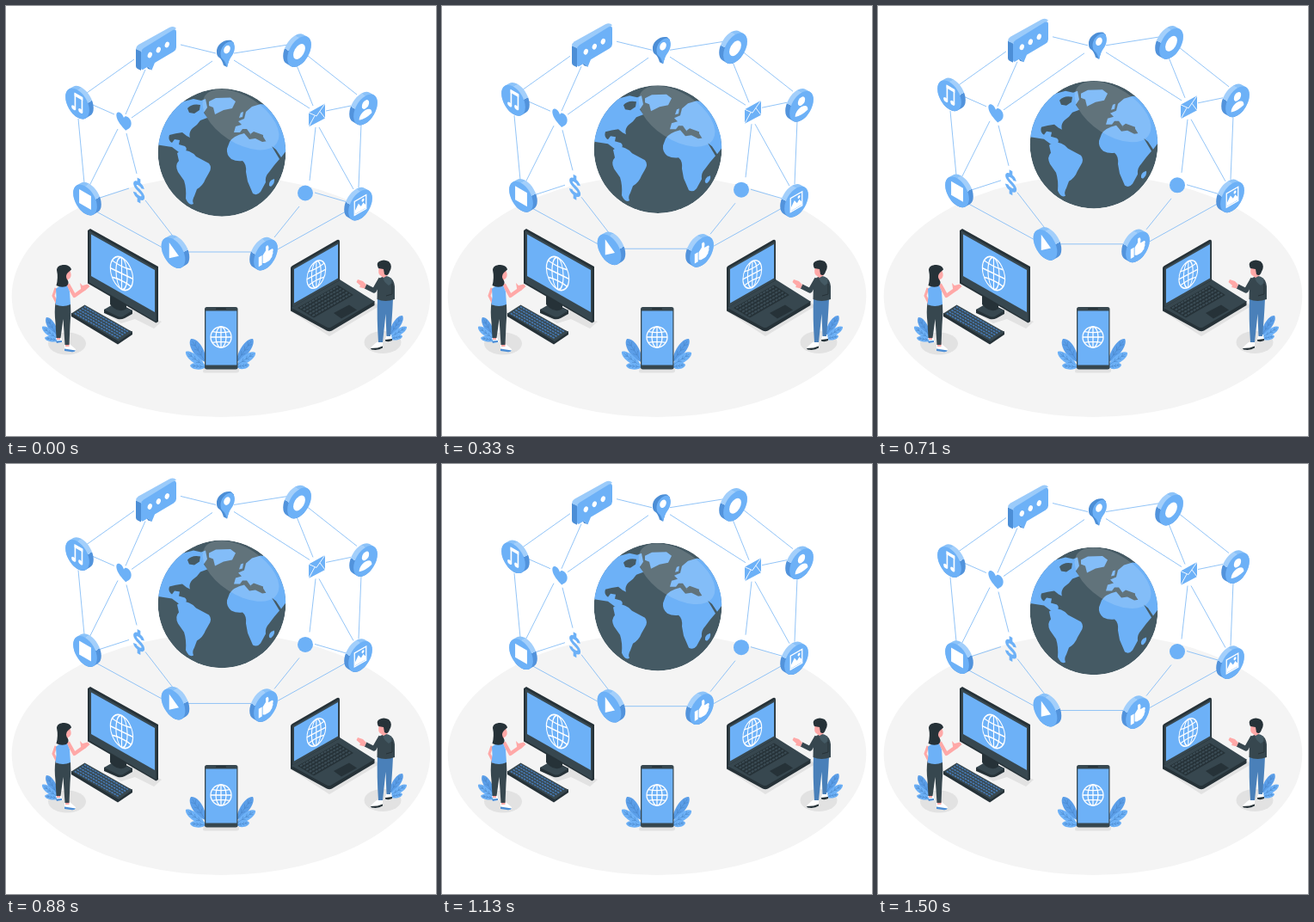
An HTML page for the animation above (1.54 s loop, 500 by 500 pixels).

```html
<!DOCTYPE html>
<html lang="en">
<head>
<meta charset="utf-8">
<title>Connected world</title>
<style>
html, body { margin: 0; width: 100%; height: 100%; overflow: hidden; background: #fff; }
svg { display: block; width: 100vw; height: 100vh; }
.b { fill: #6db1f7; }
.d { fill: #4c8ed6; }
.l { fill: #9bcbfa; }
.w { fill: #fff; }
.k { fill: #263238; }
.g { fill: #37474f; }
.m { fill: #455a64; }
.s { fill: #e2e2e2; }
.p { fill: #ffa8a7; }
.wire { fill: none; stroke: #fff; }
</style>
</head>
<body>
<svg viewBox="0 0 500 500">
  <defs>
    <clipPath id="ball"><circle cx="251" cy="170.4" r="74.3"/></clipPath>
    <linearGradient id="rim" gradientUnits="userSpaceOnUse" x1="-20" y1="-20" x2="20" y2="20">
      <stop offset=".3" stop-color="#8cc3f9"/><stop offset=".3" stop-color="#a3cffb"/>
      <stop offset=".58" stop-color="#a3cffb"/><stop offset=".58" stop-color="#5293dc"/>
    </linearGradient>
    <g id="coin">
      <path d="M0 0L5.7 -5.7" stroke="url(#rim)" stroke-width="32" stroke-linecap="round"/>
      <circle class="b" r="16"/>
    </g>
    <g id="net" class="wire">
      <circle r="16"/><ellipse rx="8" ry="16"/>
      <path d="M0 -16V16M-16 0H16M-13.4 -8.5Q0 -6 13.4 -8.5M-13.4 8.5Q0 6 13.4 8.5"/>
    </g>
  </defs>

  <rect class="w" width="500" height="500"/>
  <ellipse cx="250" cy="337.5" rx="243.3" ry="140.5" fill="#f4f4f4"/>

  <!-- desktop -->
  <path class="s" d="M117 358L148 352L181 367L172 375L150 364L134 369Z"/>
  <path class="k" d="M114 353V357L130 364Q134 365 138 363L147 358V354L134 347Z"/>
  <path class="g" d="M114 353L126 346L147 354L136 361Q133 362 130 361Z"/>
  <path class="k" d="M121 334L140 345V352Q133 357 125 351L121 347Z"/>
  <path class="k" d="M95 261L98 259L177 303V367L174.500 368.500L95 322.500Z"/>
  <path class="g" d="M97 261.500L174.500 305V367L97 321.500Z"/>
  <path class="b" d="M99 265.500L173 307V356L99 314Z"/>
  <use href="#net" transform="matrix(.82 .4 0 1.15 134.500 311)" stroke-width="1.400"/>
  <path class="k" d="M76 357V361L130 393.500L147 382V378.500Z"/>
  <path class="g" d="M76 357.500L91.500 347.500L147 379L131 390Z"/>
  <g id="keys" fill="none" stroke="#4679b3" stroke-width="1.600" stroke-dasharray="2.600 .9"></g>

  <!-- laptop -->
  <path class="s" d="M331 355L376 384L434 349L428 344Z"/>
  <path class="k" d="M331 350V354.500L373 377.500Q376 379 379 377.500L428.500 348V343Z"/>
  <path class="g" d="M331 350.500L388 318L428.500 343.500L378 373.500Q376 374.500 373 373.500Z"/>
  <path class="k" d="M339 351L386 324.500L404 336L358 362.500Z"/>
  <g id="pads" fill="none" stroke="#3b4c55" stroke-width="2" stroke-dasharray="3 1"></g>
  <path class="k" d="M381 357L399 347.500L408 353.500L390 363.500Z"/>
  <path class="k" d="M331 305Q331 303 333 302L385 272Q388 271 388 274V319L331 351.500Z"/>
  <path class="g" d="M333.500 304.500L387 274V319L333.500 350Z"/>
  <path class="b" d="M335 306L386 277V316.500L335 345.500Z"/>
  <use href="#net" transform="matrix(.68 -.36 0 .95 360.800 312)" stroke-width="1.600"/>

  <!-- people -->
  <ellipse class="s" cx="71" cy="392.500" rx="22" ry="13"/>
  <ellipse class="s" cx="438" cy="391" rx="21.500" ry="13"/>
  <g id="leaves"></g>

  <g>
    <path class="w" d="M58 386L64 384L66 391L60 392Z M68 394L74 393L81 399Q82 402 77 402L68 400Z"/>
    <path d="M58 389.500L65 389V391L59 392ZM68 398.500L81 400.500Q80 403 75 402L68 401Z" fill="#4c8ed6"/>
    <path class="p" d="M59 383H63V388H59ZM69 391H73.500V396H69Z"/>
    <path class="g" d="M57.500 345L75 346Q76 358 74.500 371L73.500 394H68.500L66.500 364L63.500 386H58.500L57.500 368Q56 355 57.500 345Z"/>
    <path d="M58 328L55 337L60 347" fill="none" stroke="#ffa8a7" stroke-width="3"/>
    <path d="M72 323.500L79.500 337L90 329.500" fill="none" stroke="#ffa8a7" stroke-width="4.200" stroke-linejoin="round"/>
    <path class="p" d="M87 328L86 322L89 325L95 323.500L97.500 326L92 331L88 332Z"/>
    <path class="b" d="M58 329Q63 324 71 325L74 332L75 347Q66 351 57.500 347L58.500 338Z"/>
    <path class="p" d="M68 308H74.500Q77 314 74 317L72 318V325H66Z"/>
    <path class="k" d="M59 307C59 299 75 299 76 306.500L72 310Q69 313 70.500 317Q75 323 70 326Q64 328 58.500 325Q61 316 59 307Z"/>
  </g>

  <g>
    <path class="w" d="M431 391L438 390V397Q434 401 426 399L424 397ZM442 383L448 382L449 388Q446 391 441 389Z"/>
    <path class="k" d="M424 398L432 397.500L438 395.500V397.500Q433 401 425 399.500ZM441 388L449 387V389Q445 391 441 389.500Z"/>
    <path d="M432 340L450 340Q449 364 447 384H442.500L441.500 358L438 391H433Q431 362 432 340Z" fill="#4a80b9"/>
    <path d="M436 317L428 331L418 326" fill="none" stroke="#37474f" stroke-width="5.500" stroke-linejoin="round"/>
    <path class="p" d="M419 324L415 320L409 318L407.500 321L412 325L411 327L417 328.500Z"/>
    <path class="g" d="M432 320Q436 313 445 315Q451 317 452 326V341Q441 345 431.500 341Z"/>
    <path class="m" d="M438 315Q443 312 448 317Q450 322 445 325Q439 321 438 315Z"/>
    <path d="M449 323V335L442 337" fill="none" stroke="#263238"/>
    <path class="p" d="M434 303Q432 311 435 313L439 316L444 313V302Z"/>
    <path class="k" d="M433 305Q430 299 434 297Q439 294 445 297Q450 302 446 309Q444 315 440 312L439 306Z"/>
  </g>

  <!-- phone -->
  <path class="s" d="M230 421H271V425Q270 426.500 268 426.500H231Q229 426.500 229 425Z"/>
  <rect class="g" x="231" y="350" width="38.500" height="72.500" rx="2.500"/>
  <rect class="b" x="232.300" y="354.500" width="36" height="63"/>
  <rect class="k" x="244" y="351.300" width="12" height="1.800" rx=".9"/>
  <use href="#net" transform="translate(250 385) scale(.75)" stroke-width="1.700"/>

  <!-- floating network -->
  <g id="float">
    <path id="links" fill="none" stroke="#7fbaf6" stroke-width=".85"/>

    <g clip-path="url(#ball)">
      <circle class="m" cx="251" cy="170.400" r="74.300"/>
      <g class="b">
        <path d="M174 161L184 132L203 112L218 108L227 110L232 108L234 118L230 124L234 130L226 133L222 138L217 142Q212 147 214 153L210 151L205 147Q197 148 190 150Q188 156 193 159L196 155L202 156L201 161L208 163Q211 165 209 169L201 170L193 164L180 162Z"/>
        <path d="M236 111L244 107L261 106.500L267 111L263 119L253 121L243 126L241 118L236 116Z"/>
        <path d="M199 171Q205 166 213 169Q218 171 221 175L236 183Q240 188 236 194L232 201Q229 209 222 213L219 221Q216 226 218 230Q213 233 209 224Q210 212 207 203L200 193Q196 185 201 180Z"/>
        <path d="M257 166L260 158Q264 151 277 148L283 155L290 154L298 158L311 156L326 150V168L320 176L314 167L309 163L318 178L312 185L306 193Q301 198 302 205L296 216Q292 221 287 218L281 204L279 193Q280 184 275 180Q268 181 262 178Q256 173 257 166Z"/>
        <path d="M265 147L267 140L274 138L270 134L277 131L279 123L286 117L296 114L310 116L330 138V160H304L299 152L290 151L288 147L285 150L280 143L275 143L272 147Z"/>
        <path d="M273 124L276 123L275 129L271 130Z"/>
        <path d="M306 209Q305 203 312 201Q313 206 308 210Z"/>
      </g>
      <path class="m" d="M211 119Q216 113 226 115L225 121L219 125L213 124ZM284 149L288 146L299 150V155L289 153Z"/>
      <ellipse class="w" cx="273" cy="132" rx="50" ry="27" transform="rotate(33 273 132)" opacity=".15"/>
    </g>

    <!-- chat bubble -->
    <path class="d" d="M151 50L157 52V75L153 73Q151 72 151 70ZM163 69L170 74.500L165 73Z"/>
    <path class="l" d="M151 50Q151 47 154 45L190 25Q195 22.500 198 26L157 53Z"/>
    <path class="b" d="M157 54Q157 51 160 49L194 28Q198 26 198 30V48Q198 51 195 53L173 66L169.500 74.500L165 70.500L160 73.500Q157 75 157 72Z"/>
    <g class="w">
      <ellipse cx="167.300" cy="57" rx="2.500" ry="3.500" transform="rotate(20 167.300 57)"/>
      <ellipse cx="177.300" cy="51" rx="2.500" ry="3.500" transform="rotate(20 177.300 51)"/>
      <ellipse cx="187.300" cy="45" rx="2.500" ry="3.500" transform="rotate(20 187.300 45)"/>
    </g>

    <!-- map pin -->
    <path class="d" d="M245 54C244 45 254 38 262 40L265 43L257 71L253 69Q251 62 248 60Q245 58 245 54Z"/>
    <path class="b" d="M249.500 56C249 47 258 39.500 263 41.500C268 45 266 54 262 59Q259 63 257 71.500Q255 64 252 62Q249.500 60 249.500 56Z"/>
    <ellipse class="w" cx="257" cy="50.500" rx="3.500" ry="5" transform="rotate(25 257 50.500)"/>

    <path class="b" transform="matrix(.866 .5 0 1 137 133.500)" d="M0 -3.500C-2 -9 -10.500 -8 -10 -1C-9.500 5 -2 8 2.500 10C5 7 10 4 10 -2C10 -8 2 -9 0 -3.500Z"/>
    <path transform="matrix(.866 .5 0 1 154.500 214.500)" fill="none" stroke="#6db1f7" stroke-width="4.200"
      d="M5.300 -4.500C4 -9 -5.300 -9 -5.300 -4.500C-5.300 .5 5.600 -1 5.600 4.500C5.600 9 -4.500 9 -5.600 4.500M0 -14V-8M0 8V14"/>
    <path class="b" d="M352 124L371 113.500V130.500L352 140.500Z"/>
    <path class="wire" d="M352 124L361 128L371 113.500M352 140.500L359 127.500M371 130.500L365 122.500" stroke-width=".9"/>
    <circle class="b" cx="348" cy="217.500" r="9"/>

    <g id="coins"></g>
  </g>
</svg>
<script>
const $ = id => document.getElementById(id);

// Straight links between the icons: x1, y1, x2, y2
const links = [
  [203, 45, 244, 55], [265, 55, 328, 45], [240, 64, 146, 130], [265, 63, 353, 119],
  [149, 62, 94, 101], [162, 74, 139, 126], [101, 115, 126, 126], [84, 131, 91, 206],
  [130, 143, 97, 209], [140, 148, 152, 195], [109, 223, 143, 212], [105, 239, 182, 281],
  [162, 226, 196, 270], [212, 286, 287, 286], [312, 269, 341, 233], [314, 284, 395, 239],
  [359, 217, 397, 228], [353, 203, 360, 141], [364, 141, 404, 213], [413, 137, 410, 211],
  [372, 122, 401, 116], [338, 69, 357, 116], [351, 58, 408, 103]
];
$("links").setAttribute("d", links.map(([a, b, c, d]) => `M${a} ${b}L${c} ${d}`).join(""));

// Coin with a glyph on its face; side 1 faces left, -1 faces right
const coin = (x, y, side, glyph) =>
  `<use href="#coin" transform="matrix(${.866 * side} .5 0 1 ${x} ${y})"/>
   <g class="w" transform="matrix(.866 ${.5 * side} 0 1 ${x} ${y})">${glyph}</g>`;

$("coins").innerHTML =
  coin(83, 113.5, 1, `<path class="wire" d="M-3 7V-9.500H6.300V6" stroke-width="1.900"/>
    <path d="M-4 -11H7.200V-7H-4Z"/><ellipse cx="-5" cy="7.300" rx="3" ry="2.500"/><ellipse cx="4.300" cy="6.300" rx="3" ry="2.500"/>`) +
  coin(92, 225.5, 1, `<rect x="-8" y="-8.500" width="16" height="16"/>`) +
  coin(194.5, 287, 1, `<path d="M-5.500 -9.200L7.500 0L-5.500 9Z"/>`) +
  coin(341, 53, -1, `<circle r="8"/>`) +
  coin(418, 120.5, -1, `<circle cy="-6" r="4.800"/><path d="M-8.500 8C-9 -2 9 -2 8.500 8Q0 11 -8.500 8Z"/>`) +
  coin(412, 231.5, -1, `<path class="wire" d="M-7.800 -8H7.800V8H-7.800Z" stroke-width="1.500"/>
    <path d="M-7 7V3L-2.500 -3L1 2L4 -1L7 3V7Z"/><circle cx="3.500" cy="-4" r="1.700"/>`) +
  coin(302, 289.5, -1, `<path d="M-9.500 -2H-5V9H-9.500ZM-4 -1.500L0 -5V-9.500Q3 -11.500 4 -7L3.500 -3H8.500Q11 -2 9.500 1Q10.500 3 8.800 4.500Q9 7 7 7.300Q6.500 9 4 9H-1L-4 7.500Z"/>`);

// Leaf from base (x, y) to a tip, w wide, with a vein
function leaf(x, y, tx, ty, w, color) {
  const dx = tx - x, dy = ty - y, n = Math.hypot(dx, dy);
  const at = (f, s) => `${x + dx * f - dy / n * s} ${y + dy * f + dx / n * s}`;
  let veins = `M${x} ${y}L${at(.9, 0)}`;
  for (const f of [.3, .5, .7])
    veins += `M${at(f + .12, -w * .4)}L${at(f, 0)}L${at(f + .12, w * .4)}`;
  return `<path fill="${color}" d="M${x} ${y}C${at(.3, w)} ${at(.9, w)} ${tx} ${ty}C${at(.9, -w)} ${at(.3, -w)} ${x} ${y}Z"/>
    <path d="${veins}" fill="none" stroke="#4580c2" stroke-width=".5"/>`;
}

const back = "#5b9ee8", front = "#6db1f7";
$("leaves").innerHTML =
  leaf(232, 414, 215, 387, 8, back) + leaf(232, 420, 209, 402, 6, front) + leaf(233, 420, 214, 418, 5, front) +
  leaf(268, 414, 287, 387, 7, back) + leaf(268, 418, 290, 403, 6, front) + leaf(267, 420, 283, 417, 5, front) +
  leaf(61, 386, 47, 362, 6, back) + leaf(61, 388, 42, 373, 5, front) + leaf(62, 389, 45, 386, 4, front) +
  leaf(446, 383, 461, 360, 6, back) + leaf(446, 386, 466, 373, 5, front) + leaf(446, 387, 461, 384, 4, front);

// Key rows on both keyboards
const rows = (n, x, y, sx, sy, dx, dy) => Array.from({ length: n }, (_, i) =>
  `<path d="M${x + sx * i} ${y + sy * i}l${dx} ${dy}"/>`).join("");
$("keys").innerHTML = rows(5, 91, 349.7, -2.8, 1.9, 51, 29);
$("pads").innerHTML = rows(5, 342, 351.3, 3.6, 2.2, 44, -25);

// The network drifts up and back at constant speed, in 37 even steps
const LOOP = 1540, STEPS = 37, RISE = .54, TURN = 17.5;
function draw(ms) {
  const k = Math.floor((ms % LOOP + 2) / LOOP * STEPS) % STEPS;
  const y = RISE * (Math.abs(k - TURN) - TURN);
  $("float").setAttribute("transform", `translate(0 ${y.toFixed(2)})`);
}

let start;
function tick(now) {
  start ??= now;
  draw(now - start);
  requestAnimationFrame(tick);
}
draw(0);
requestAnimationFrame(tick);
</script>
</body>
</html>
```
